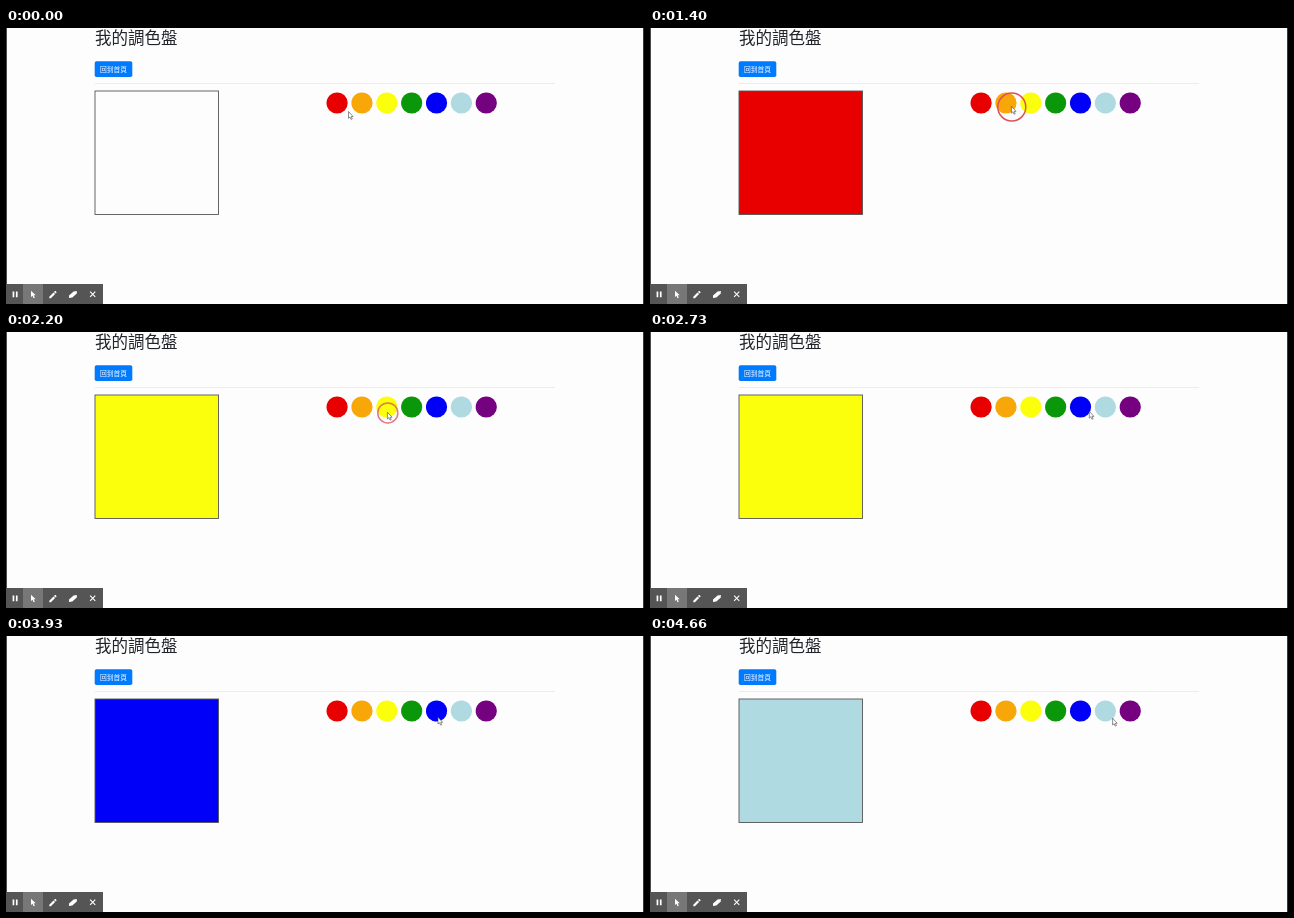
An HTML page for the animation above (4.73 s loop, 638x276 px).

```html
<!DOCTYPE html>
<html lang="zh-Hant">
<head>
<meta charset="utf-8">
<title>我的調色盤</title>
<style>
  html, body { margin: 0; width: 100%; height: 100%; overflow: hidden; background: #fdfdfd; }
  svg { display: block; width: 638px; height: 276px; }
  text { font-family: "Noto Sans CJK TC", "Noto Sans CJK", "Noto Sans CJK JP", sans-serif; }
  .title { font-size: 16.5px; font-weight: 300; fill: #212529; }
  .label { font-size: 6.8px; fill: #fff; }
</style>
</head>
<body>
<svg viewBox="0 0 638 276">
  <rect width="638" height="276" fill="#fdfdfd"/>
  <path d="M.4 0V276M637.5 0V276" stroke="#222" stroke-width=".9"/>

  <text class="title" x="89" y="16.4">我的調色盤</text>
  <rect x="88.7" y="33.2" width="37.6" height="15.8" rx="1.8" fill="#007bff"/>
  <text class="label" x="93.9" y="43.6">回到首頁</text>
  <path d="M89 55.5H549" stroke="#ececec"/>

  <rect id="canvas" x="89" y="63" width="123.5" height="123.5" stroke="#555" stroke-width=".9"/>
  <g id="swatches"></g>

  <g id="toolbar">
    <rect y="256" width="97" height="20" fill="#555"/>
    <rect x="17" y="256" width="20" height="20" fill="#777"/>
    <g fill="#fff">
      <path d="M6.6 263.5h1.7v5.8h-1.7zM9.9 263.5h1.7v5.8h-1.7z"/>
      <path d="M25 262.8v6.3l1.5-1.3 1.1 2.5 1.2-.5-1.1-2.5h2z"/>
      <path d="M43.3 268.7v1.6h1.6l4.2-4.2-1.6-1.6zM48 264l1.6 1.6.8-.8q.5-.5 0-.9l-.8-.8q-.4-.4-.8 0z"/>
      <path d="M63 267.5l4.6-4 3.2-.4v2.5l-4.5 4-3.3.5z"/>
    </g>
    <path d="M84.1 263.7l5.2 5.2M89.3 263.7l-5.2 5.2" stroke="#fff" stroke-width="1.1"/>
  </g>

  <circle id="ring" fill="none" stroke="#e0505a" stroke-width="1.5"/>
  <path id="cursor" d="M0 0V6.8L1.5 5.5 2.6 7.9 3.8 7.4 2.7 5.1H4.6Z"
        fill="#fff" stroke="#444" stroke-width=".6" stroke-linejoin="round"/>
</svg>
<script>
const LOOP = 4730, STEP = 200 / 3;
const [RED, ORANGE, YELLOW, GREEN, BLUE, SKY, PURPLE] = colors =
  ["#e80000", "#f7a708", "#fbff0b", "#0a970a", "#0000f8", "#b0dae1", "#750080"];

// time, x, y of the pointer tip
const path = [
  [0, 342.5, 83.5], [60, 342.5, 83.5], [330, 333.2, 80.3], [730, 333.2, 80.3],
  [1130, 361.4, 78.3], [1530, 361.4, 78.3], [1830, 381.4, 80.2], [2260, 381.4, 80.2],
  [2690, 439.3, 79.3], [2760, 439.3, 79.3], [2900, 432, 81.2], [4060, 432, 81.2],
  [4330, 462.6, 82.2], [LOOP, 462.6, 82.2]
];

// press time, release time, chosen colour
const clicks = [
  [330, 460, RED], [1260, 1460, ORANGE], [1960, 2120, YELLOW],
  [2920, 3060, BLUE], [4340, 4460, SKY]
];

const $ = id => document.getElementById(id);
const clamp = v => Math.min(1, Math.max(0, v));
const ease = v => v * v * (3 - 2 * v);

$("swatches").innerHTML = colors.map((c, i) =>
  `<circle cx="${331.1 + i * 24.86}" cy="75" r="10.6" fill="${c}"/>`).join("");

function pointer(t) {
  const i = Math.max(1, path.findIndex(p => p[0] >= t));
  const [t0, x0, y0] = path[i - 1], [t1, x1, y1] = path[i];
  const k = ease(clamp((t - t0) / (t1 - t0)));
  return [x0 + (x1 - x0) * k, y0 + (y1 - y0) * k];
}

function draw(t) {
  const [x, y] = pointer(t);
  let fill = "#fdfdfd", size = 0;
  for (const [down, up, color] of clicks) {
    if (t >= up) fill = color;
    // the ring opens on press and closes after release
    if (t >= down && t < up + 150)
      size = t < up ? clamp((t - down + 40) / 120) : 1 - clamp((t - up) / 150) ** 2;
  }
  $("canvas").setAttribute("fill", fill);
  $("cursor").setAttribute("transform", `translate(${x} ${y})`);
  const ring = $("ring");
  ring.setAttribute("cx", x + .4);
  ring.setAttribute("cy", y + .7);
  ring.setAttribute("r", 14 * size);
  ring.setAttribute("opacity", Math.min(1, size * 1.1));
}

const start = performance.now();
function tick() {
  const t = (performance.now() - start) % LOOP;
  draw(Math.floor((t + 7) / STEP) * STEP);
  requestAnimationFrame(tick);
}
draw(0);
requestAnimationFrame(tick);
</script>
</body>
</html>
```
